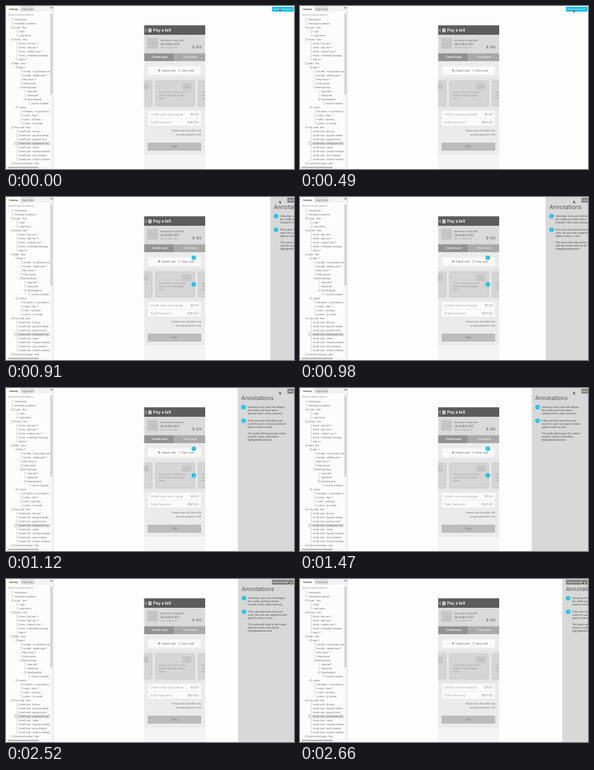
These frames come from a looping animation (360 px wide and 204 px high, 2730 ms). An HTML page:

```html
<!DOCTYPE html>
<html lang="en">
<head>
<meta charset="utf-8">
<title>Prototype annotations</title>
<style>
  html, body { margin: 0; width: 100%; height: 100%; overflow: hidden; background: #fdfdfd; }
  svg { display: block; width: 100vw; height: 100vh; }
  text { font-family: "Liberation Sans", Arial, sans-serif; text-rendering: geometricPrecision; }
  .round { font-family: Inter, "Open Sans", sans-serif; }
  .strong { font-weight: 600; }
</style>
</head>
<body>
<svg id="stage" viewBox="0 0 360 204">
  <defs>
    <clipPath id="treeClip"><rect y="8" width="55" height="193"/></clipPath>
    <clipPath id="phoneClip"><rect x="172.7" y="24" width="76.3" height="180"/></clipPath>
  </defs>
  <g id="sidebar"></g>
  <g id="phone" clip-path="url(#phoneClip)"></g>
  <g id="badges"></g>
  <g id="panel"></g>
  <g id="button"></g>
  <path id="cursor" d="M0 0V4.3L1.1 3.4L1.9 5L2.6 4.7L1.9 3.1H3.1Z" fill="#333" stroke="#fff" stroke-width=".35"/>
</svg>
<script>
const LOOP = 2730, STEP = 70, CYAN = '#14c0e6';
const $ = id => document.getElementById(id);

function add(parent, tag, attrs, content) {
  const el = document.createElementNS('http://www.w3.org/2000/svg', tag);
  for (const key in attrs) el.setAttribute(key, attrs[key]);
  if (content !== undefined) el.textContent = content;
  parent.appendChild(el);
  return el;
}
const rect = (g, x, y, width, height, fill, extra) =>
  add(g, 'rect', { x, y, width, height, fill, ...extra });
const label = (g, x, y, size, fill, content, extra) =>
  add(g, 'text', { x, y, 'font-size': size, fill, ...extra }, content);
const END = { 'text-anchor': 'end' }, MIDDLE = { 'text-anchor': 'middle' };
const ROUND = { class: 'round' }, STRONG = { class: 'round strong' };

function badge(g, x, y, number) {
  add(g, 'circle', { cx: x, cy: y, r: 2.8, fill: CYAN });
  label(g, x, y + 1.1, 3.1, '#fff', number, MIDDLE);
}

// Leading dots give the depth of each page in the tree.
const pages = `Introduction
Principles & patterns
+Login - flow
.Login
.Login forms
+Home - flow
.Home - first use **
.Home - light use **
.Home - medium use **
.Home - immediate message
.Menu **
+Bills - flow
.+Bills **
..No bills - no providers setup
..No bills - all bills paid **
..Bills menu **
..Filter period
..+Bill Summary
...View bill **
...Delete bill
...+Download bill
....Cancel schedule
.+Letters
..No letters - no providers setup
..Letters - flow **
..Letter - summary
..Letters - no results
+Pay a bill - flow
.Credit card - first use
.Credit card - payment details
.Credit card - payment error
.Credit card - subsequent use
.Credit card - carrier
.Credit card - manual schedule
.Credit card - auto schedule
.Credit card - confirm schedule
+Personal Storage - flow`.split('\n');

function drawSidebar(g) {
  rect(g, 0, 0, 59, 204, '#fcfcfc');
  rect(g, 0, 0, 59, 7, '#f2f2f2');
  rect(g, 0, 0, 18, 7.5, '#fff');
  rect(g, 18, 0, 17, 7, '#e2e2e2');
  label(g, 4, 4.9, 2.9, '#333', 'Sitemap', { class: 'strong' });
  label(g, 20, 4.9, 2.9, '#666', 'Page Notes');
  rect(g, 55.5, 1.3, 3, 1.8, '#999');
  label(g, 3, 12, 2.9, '#888', 'Reset Collected Options');
  const tree = add(g, 'g', { 'clip-path': 'url(#treeClip)' });
  pages.forEach((page, i) => {
    const [, dots, plus, name] = page.match(/^(\.*)(\+?)(.*)$/);
    const x = 11 + dots.length * 5.3, y = 17 + i * 5;
    if (name.endsWith('subsequent use')) rect(tree, 10, y - 2.3, 45, 4.6, '#e0e0e0');
    rect(tree, x - 3.2, y - 1.2, 1.8, 2.4, plus ? '#d0d0d0' : '#f5f5f5',
      { stroke: '#b5b5b5', 'stroke-width': .25 });
    if (plus) rect(tree, x - 5.4, y - .5, 1, 1, '#bbb');
    label(tree, x, y + 1, 2.9, '#555', name);
  });
  rect(g, 55, 8, 3.5, 194, '#f6f6f6');
  rect(g, 55.5, 9, 2.5, 102, '#d2d2d2', { rx: 1.2 });
  rect(g, 0, 201, 55, 3, '#f6f6f6');
  rect(g, 2, 201.3, 39, 1.8, '#b5b5b5', { rx: .9 });
  rect(g, 58.7, 0, .6, 204, '#d0d0d0');
}

function drawCard(g, x) {
  rect(g, x, 93.7, 48.5, 31.5, '#d5d5d5', { rx: 1.5, stroke: '#b9b9b9', 'stroke-width': .5 });
  rect(g, x + 34, 97.5, 10, 6.7, '#cacaca', { stroke: '#aaa', 'stroke-width': .4 });
  label(g, x + 39, 101.8, 2.4, '#999', 'Logo', MIDDLE);
  ['XXXX XXXX XXXX 1234', 'CARD HOLDER NAME', '01/15'].forEach((line, i) =>
    label(g, x + 4, 109.3 + i * 3.9, 3, '#949494', line));
}

function drawPhone(g) {
  rect(g, 172, 24, 77, 180, '#f4f4f4');
  rect(g, 172, 69, 77, 117, '#ebebeb');
  rect(g, 172, 89, 77, 40, '#e5e5e5');
  rect(g, 172, 24.2, 77, 12, '#5c5c5c');
  add(g, 'path', { d: 'M176 28.7L174.2 30.5L176 32.3', fill: 'none', stroke: '#fff', 'stroke-width': .8 });
  rect(g, 178, 28.2, 3.8, 4.6, '#eee', { rx: .4 });
  [29.4, 30.5, 31.6].forEach(y => rect(g, 178.8, y, 2.2, .4, '#777'));
  label(g, 184, 32.2, 5.2, '#fff', 'Pay a bill', STRONG);

  rect(g, 172, 36.2, 77, 23, '#dadada');
  rect(g, 177, 40.5, 12.5, 12.5, '#c6c6c6', { stroke: '#b2b2b2', 'stroke-width': .4 });
  label(g, 183.2, 47.8, 2.7, '#aaa', 'Logo', MIDDLE);
  label(g, 193, 43.9, 2.9, '#555', 'Received 12 Aug 2013');
  label(g, 193, 49, 4.4, '#666', 'Quoldra bill', ROUND);
  label(g, 193, 53.3, 2.7, '#888', 'Due 15 Sept 2013');
  label(g, 244.5, 53.4, 4.5, '#555', '$ 100', { ...END, ...ROUND });

  rect(g, 172, 59.2, 38.5, 9.8, '#929292');
  rect(g, 210.5, 59.2, 38.5, 9.8, '#a9a9a9');
  label(g, 192, 65.4, 3.6, '#fff', 'Credit card', { ...MIDDLE, ...STRONG });
  label(g, 230, 65.4, 3.6, '#eee', 'Your bank', { ...MIDDLE, ...STRONG });

  rect(g, 177.5, 75.5, 66, 10.5, '#fafafa', { rx: 1 });
  [[191.3, 'Saved card'], [217, 'New card']].forEach(([cx, name], i) => {
    add(g, 'circle', { cx, cy: 80.7, r: 1.2, fill: '#fff', stroke: '#888', 'stroke-width': .4 });
    if (!i) add(g, 'circle', { cx, cy: 80.7, r: .7, fill: '#555' });
    label(g, cx + 3, 81.9, 3.5, '#666', name);
  });
  [134, 187, 240.5].forEach(x => drawCard(g, x));

  rect(g, 177, 131, 67, 19, '#fbfbfb', { stroke: '#dedede', 'stroke-width': .4 });
  rect(g, 177, 140.4, 67, .4, '#dedede');
  [['Credit card surcharge', '$1.00', 137], ['Total Payment', '$101.00', 146.8]].forEach(([name, sum, y]) => {
    label(g, 180, y, 4, '#aaa', name, ROUND);
    label(g, 241, y, 3.9, '#888', sum, { ...END, ...ROUND });
  });
  label(g, 244, 157.3, 3.1, '#666', 'Please note, this biller only', END);
  label(g, 244, 161.6, 3.1, '#666', 'accepts payment in full', END);
  rect(g, 177, 171, 67, 10, '#bcbcbc', { rx: .6 });
  label(g, 210.5, 177.3, 3.9, '#777', 'Pay', { ...MIDDLE, ...ROUND });
}

function drawPanel(g) {
  rect(g, 289.7, 0, 70.3, 204, '#d8d8d8');
  label(g, 294, 15.4, 7.2, '#555', 'Annotations', ROUND);
  badge(g, 297, 24, 1);
  badge(g, 297, 41, 2);
  const notes = [
    [24.7, "Selecting 'new card' will display", 'the credit card form below', 'instead of the cards carousel.'],
    [41.7, 'If the user has more than one', 'card, the user can swipe left and', 'right to select a card.'],
    [57.6, 'The cards will snap to the center', 'and the center card will be', 'highlighted/selected.']
  ];
  for (const [top, ...lines] of notes)
    lines.forEach((line, i) => label(g, 302, top + i * 4, 3.35, '#444', line));
}

drawSidebar($('sidebar'));
drawPhone($('phone'));
badge($('badges'), 234.7, 76, 1);
badge($('badges'), 234.7, 109.4, 2);
drawPanel($('panel'));
const buttonBox = rect($('button'), 332.5, 1, 27, 6, CYAN, { rx: .6 });
const buttonText = label($('button'), 346, 5, 2.9, '#fff', '', MIDDLE);

const clamp = v => Math.max(0, Math.min(1, v));
const swing = v => .5 - Math.cos(Math.PI * clamp(v)) / 2;

// Cursor stops: time, x, y
const stops = [[0, 341.5, 3], [420, 341.5, 3.5], [490, 341.5, 4], [1540, 341.5, 4],
  [1820, 300, 34], [2100, 352.5, 3], [2170, 353, 2.5], [LOOP, 353, 2.5]];

function cursorAt(t) {
  const i = stops.findIndex(stop => stop[0] > t);
  const [t0, x0, y0] = stops[i - 1], [t1, x1, y1] = stops[i];
  const k = swing((t - t0) / (t1 - t0));
  return [x0 + (x1 - x0) * k, y0 + (y1 - y0) * k];
}

function render(time) {
  const t = Math.floor(time % LOOP / STEP) * STEP;
  const open = t >= 700 && t < 2450;
  const hovered = t < 700 || (t >= 2100 && t < 2450);
  const shown = swing((t - 766) / 320) - swing((t - 2505) / 294);
  $('panel').setAttribute('transform', `translate(${70.3 * (1 - shown)})`);
  $('badges').setAttribute('visibility', open ? 'visible' : 'hidden');
  buttonBox.setAttribute('x', open ? 351.7 : 332.5);
  buttonBox.setAttribute('width', open ? 8 : 27);
  buttonBox.setAttribute('fill', hovered ? CYAN : '#808080');
  buttonText.setAttribute('x', open ? 355.7 : 346);
  buttonText.textContent = open ? 'Hide' : 'Show annotations';
  $('cursor').setAttribute('transform', `translate(${cursorAt(t)})`);
}

const start = performance.now();
function tick() {
  render(performance.now() - start);
  requestAnimationFrame(tick);
}
tick();
</script>
</body>
</html>
```
